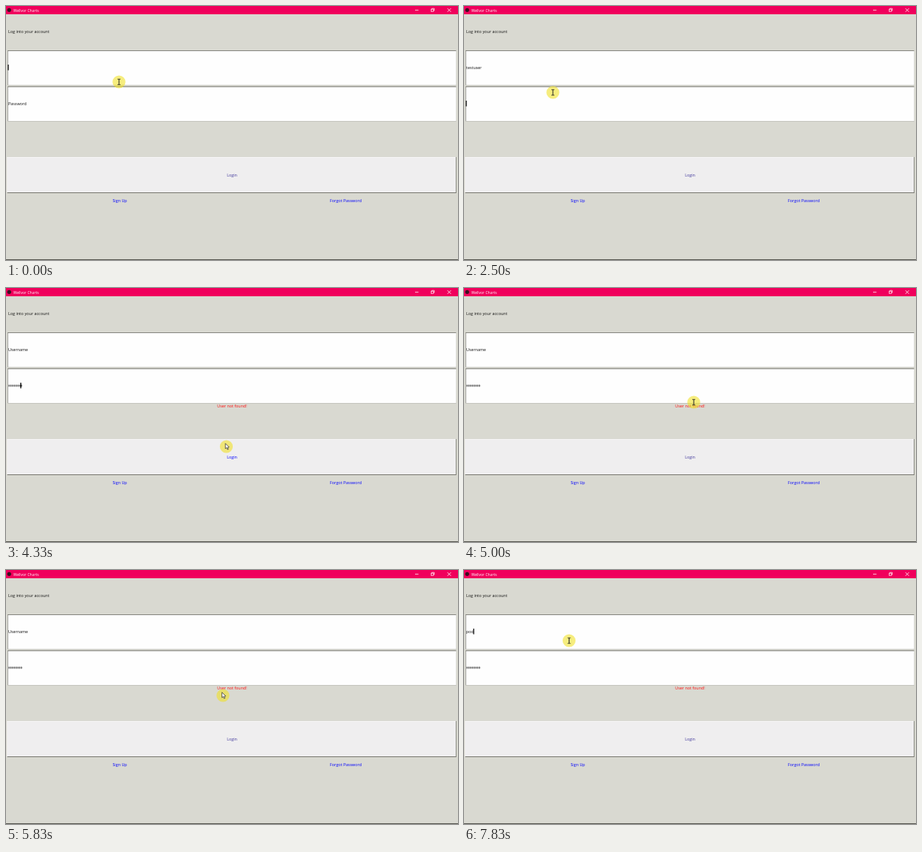
Write an HTML page with a canvas that moves like this. It is 600 px wide and 338 px high and loops after 8000 ms.

```html
<!DOCTYPE html>
<html lang="en">
<head>
<meta charset="utf-8">
<title>Login form</title>
<style>
html, body { margin: 0; width: 600px; height: 338px; overflow: hidden; background: #d9d9d1; }
canvas { display: block; width: 600px; height: 338px; }
</style>
</head>
<body>
<canvas id="stage" width="600" height="338"></canvas>
<script>
const ctx = document.getElementById('stage').getContext('2d');
const LOOP = 8000;
const STEP = 1000 / 12;
const STAR_WIDTH = 2.34;
const USER_Y = 84, PASS_Y = 132;

// Steps at which each character is entered
const userKeys = [11, 13, 15, 16, 18, 19, 21, 22];
const passKeys = [37, 38, 38, 41, 42, 44, 45, 46];
const retryKeys = [87, 91, 94];

// Pointer path: step, x, y
const path = [
  [0, 150, 101], [25, 150, 101], [30, 118, 115], [46, 118, 115],
  [50, 292.5, 211], [54, 292.5, 211], [60, 305, 152], [63, 321, 160],
  [65, 331, 164], [70, 288, 167], [73, 326, 166], [80, 139.5, 94], [96, 139.5, 94]
];

const typed = (keys, k) => keys.filter(s => s <= k).length;
const within = (k, a, b) => k >= a && k < b;

function pointerAt(k) {
  let i = 0;
  while (i < path.length - 2 && path[i + 1][0] <= k) i++;
  const [a, ax, ay] = path[i], [b, bx, by] = path[i + 1];
  const u = (k - a) / (b - a), e = u * u * (3 - 2 * u);
  return [ax + (bx - ax) * e, ay + (by - ay) * e];
}

function rect(x, y, w, h, color) {
  ctx.fillStyle = color;
  ctx.fillRect(x, y, w, h);
}

function disc(x, y, r, color) {
  ctx.fillStyle = color;
  ctx.beginPath();
  ctx.arc(x, y, r, 0, Math.PI * 2);
  ctx.fill();
}

function line(points, color, width) {
  ctx.strokeStyle = color;
  ctx.lineWidth = width;
  ctx.beginPath();
  points.forEach(([x, y], i) => i ? ctx.lineTo(x, y) : ctx.moveTo(x, y));
  ctx.stroke();
}

function setFont(size) {
  ctx.font = size + 'px "Open Sans", "Noto Sans", sans-serif';
}

function text(str, x, y, color = '#111', align = 'left', size = 5.4) {
  setFont(size);
  ctx.fillStyle = color;
  ctx.textAlign = align;
  ctx.fillText(str, x, y);
}

function titleBar() {
  rect(0, 0, 600, 11, '#f0005c');
  disc(4.2, 5.3, 2.6, '#3a1020');
  text('Wellvor Charts', 9.7, 7.8, '#fff', 'left', 5);
  line([[543, 5.5], [547.5, 5.5]], '#ffe6ee', 0.8);
  ctx.strokeStyle = '#ffe6ee';
  ctx.strokeRect(564.3, 4.2, 3, 3);
  line([[565.4, 4], [565.4, 3.2], [568.5, 3.2], [568.5, 6.2], [567.5, 6.2]], '#ffe6ee', 0.7);
  line([[586, 3.2], [590.6, 7.8]], '#fff', 0.8);
  line([[590.6, 3.2], [586, 7.8]], '#fff', 0.8);
}

function entry(y) {
  rect(2, y, 596, 47, '#fefefe');
  rect(2, y, 596, 1, '#85857f');
  rect(2, y, 0.7, 47, '#85857f');
  rect(2, y + 46, 596, 1, '#c4c4be');
  rect(597.4, y, 0.6, 47, '#d0d0ca');
}

function button(hover, pressed) {
  rect(1.5, 201, 596, 48, '#efeeef');
  const light = pressed ? '#77776f' : '#f8f8f8';
  const dark = pressed ? '#f8f8f8' : '#77776f';
  rect(1.5, 201, 596, 0.8, light);
  rect(1.5, 201, 0.7, 48, light);
  rect(1.5, 248, 596, 1, dark);
  rect(597, 201, 0.8, 48, dark);
  text('Login', 300, 227, hover ? '#0000ff' : '#41389c', 'center');
}

function caret(x, y) {
  rect(x - 0.6, y - 6, 1.2, 7.5, '#000');
}

function stars(n) {
  for (let i = 0; i < n; i++) {
    const x = 4.2 + i * STAR_WIDTH, y = 130;
    line([[x - 1, y], [x + 1, y]], '#333', 0.7);
    line([[x, y - 1.5], [x, y + 1.5]], '#333', 0.7);
  }
}

function userField(k) {
  if (within(k, 51, 81)) {
    text('Username', 3, USER_Y);
    return;
  }
  const value = k < 51
    ? 'testuser'.slice(0, typed(userKeys, k))
    : 'pod'.slice(0, typed(retryKeys, k));
  text(value, 3, USER_Y);
  const focused = k < 28 || k >= 81;
  const blinkOff = within(k, 6, 10);
  if (focused && !blinkOff) caret(3 + ctx.measureText(value).width, USER_Y);
}

function passField(k) {
  if (k < 29) {
    text('Password', 3, PASS_Y);
    return;
  }
  const n = typed(passKeys, k);
  stars(n);
  const blinkOff = within(k, 59, 63) || within(k, 70, 74);
  if (k < 80 && !blinkOff) caret(3 + Math.min(n, 7) * STAR_WIDTH + (n ? 0.3 : 0), PASS_Y);
}

function iBeam(x, y) {
  line([[x, y - 3.6], [x, y + 3.6]], '#222', 1);
  line([[x - 2, y - 3.7], [x + 2, y - 3.7]], '#222', 0.8);
  line([[x - 2, y + 3.7], [x + 2, y + 3.7]], '#222', 0.8);
}

function arrow(x, y) {
  const shape = [[0, 0], [0, 7], [1.6, 5.6], [2.8, 8.2], [4, 7.7], [2.9, 5.2], [5, 5]];
  ctx.beginPath();
  shape.forEach(([dx, dy]) => ctx.lineTo(x + dx, y + dy));
  ctx.closePath();
  ctx.fillStyle = '#fff';
  ctx.fill();
  ctx.strokeStyle = '#222';
  ctx.lineWidth = 0.7;
  ctx.stroke();
}

function pointer(x, y) {
  disc(x, y, 8.6, 'rgba(240,225,40,0.6)');
  if (y < 153) iBeam(x, y);
  else arrow(x - 1.3, y - 4.2);
}

function draw(t) {
  const k = Math.floor((t + 5) / STEP);
  const [px, py] = pointerAt(k);
  rect(0, 0, 600, 338, '#d9d9d1');
  titleBar();
  text('Log into your account', 3, 36);
  entry(59);
  entry(107);
  userField(k);
  passField(k);
  if (k >= 51) text('User not found!', 300, 159.4, '#ff1010', 'center');
  button(py > 201 && py < 249, k === 50);
  text('Sign Up', 151, 261, '#0000ff', 'center');
  text('Forgot Password', 451, 261, '#0000ff', 'center');
  rect(0, 337, 600, 1, '#55554f');
  pointer(px, py);
}

const start = performance.now();
function tick() {
  draw((performance.now() - start) % LOOP);
  requestAnimationFrame(tick);
}
tick();
</script>
</body>
</html>
```
